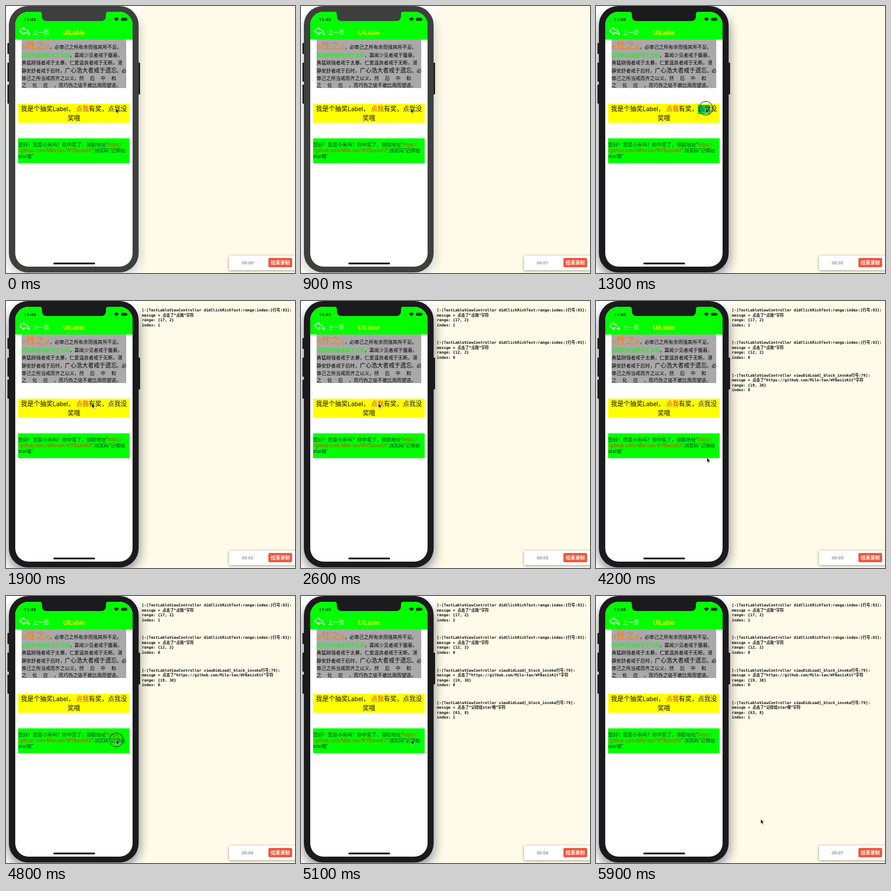
Animation, 500 px wide and 462 px high, one loop 6 s. Source, as an HTML page:

```html
<!DOCTYPE html>
<html lang="zh-CN">
<head>
<meta charset="utf-8">
<title>UILable</title>
<style>
  html, body { margin: 0; width: 100%; height: 100%; overflow: hidden; background: #fffbe8; }
  svg { display: block; width: 500px; height: 462px; }
  text { font-family: Roboto, "Noto Sans CJK SC", "Noto Sans CJK", sans-serif; white-space: pre; }
  .poem { font-size: 8.3px; fill: #000; }
  .prize { font-size: 11px; fill: #15150c; text-anchor: middle; }
  .note { font-size: 8.45px; fill: #04382c; }
  .link { fill: #d04600; }
  .log text { font: bold 6.6px "DejaVu Sans Mono", "Noto Sans CJK SC", "Noto Sans CJK", monospace; fill: #111; }
</style>
</head>
<body>
<svg viewBox="0 0 500 462">
  <defs>
    <filter id="soft" x="-30%" y="-20%" width="160%" height="140%"><feGaussianBlur stdDeviation="9.5"/></filter>
    <filter id="faint" x="-20%" y="-60%" width="140%" height="220%"><feGaussianBlur stdDeviation="2.5"/></filter>
    <clipPath id="screen"><rect x="16" y="10" width="203" height="441" rx="23"/></clipPath>
  </defs>

  <rect width="500" height="462" fill="#fffbe8"/>
  <rect width="232" height="462" fill="#fff"/>
  <rect id="shadow" x="5" y="12" width="225" height="456" rx="32" filter="url(#soft)"/>

  <g fill="#1b1b1d">
    <rect x="2.5" y="64" width="5" height="19" rx="1"/>
    <rect x="2.5" y="98" width="5" height="33" rx="1"/>
    <rect x="2.5" y="136" width="5" height="33" rx="1"/>
    <rect x="227" y="98" width="5" height="55" rx="1"/>
  </g>
  <rect id="body" x="5" y="0" width="224.500" height="461" rx="33"/>

  <g clip-path="url(#screen)">
    <rect x="16" y="10" width="203" height="441" fill="#fff"/>
    <rect x="16" y="10" width="203" height="48" fill="#00fe00"/>
  </g>
  <path id="notch" d="M58 9.500Q62 10 62 14V17Q62 26 71 26H164Q173 26 173 17V14Q173 10 177 9.500Z"/>

  <text x="31" y="25.800" font-size="8" font-weight="bold" fill="#063006">11:45</text>
  <g fill="#062806">
    <circle cx="179" cy="24" r=".5"/><circle cx="182" cy="24" r=".5"/>
    <path d="M186.500 21.800Q191 18 195.500 21.800L191 26.200Z"/>
    <rect x="199" y="20.500" width="10" height="5" rx="1.200"/>
    <rect x="209.600" y="22" width="1" height="2"/>
  </g>
  <path d="M23.500 43L31 37V40.500Q39.500 41 40.500 50Q37 45.800 31 46V49.500Z" fill="none" stroke="#fff" stroke-width="1.200" stroke-linejoin="round"/>
  <text x="46.500" y="49.300" font-size="9.300" fill="#fff">上一页</text>
  <text x="117.500" y="49.500" font-size="10.300" font-weight="600" fill="#f4f000" text-anchor="middle" style="font-family: Inter, sans-serif">UILable</text>

  <rect x="27" y="58" width="181" height="84" fill="#a9a9a9"/>
  <g class="poem">
    <text x="27" y="74"><tspan fill="#f97c10">治<tspan font-size="16">性之</tspan>道</tspan>，必审己之所有余而强其所不足。</text>
    <text x="27" y="88"><tspan fill="#00ff00">盖聪明疏通者戒于太察</tspan>，寡闻少见者戒于壅蔽，</text>
    <text x="27" y="100.500">勇猛刚强者戒于太暴，仁爱温良者戒于无断。湛</text>
    <text x="27" y="115">静安舒者戒于后时，<tspan font-size="10">广心浩大者戒于遗忘</tspan>。必</text>
    <text x="27" y="127.500">审己之所当戒而齐之以义，<tspan letter-spacing="10.300">然后中和</tspan></text>
    <text x="27" y="140"><tspan letter-spacing="10.300">之化应</tspan>，而巧伪之徒不敢比周而望进。</text>
  </g>

  <rect x="21" y="169" width="193" height="33" fill="#ffff00"/>
  <rect id="hit0" x="176" y="171" width="22" height="16" fill="#10d848"/>
  <rect id="hit1" x="121" y="171" width="22" height="16" fill="#10d848"/>
  <g class="prize">
    <text x="117.500" y="182">我是个抽奖Label， <tspan fill="#d83a20">点我</tspan>有奖，<tspan fill="#20206c">点我</tspan>没</text>
    <text x="117.500" y="197.500">奖哦</text>
  </g>

  <rect x="21" y="229" width="193" height="43" fill="#00fe00"/>
  <g class="note">
    <text x="21" y="243.300">您好！您是小禾吗？你中奖了，领取地址“<tspan class="link">https:/</tspan></text>
    <text x="21" y="253.300"><tspan class="link">/github.com/Milo-tan/WYBasisKit</tspan>”,领奖码“记得给</text>
    <text x="21" y="263.300">star哦”</text>
  </g>
  <rect x="82" y="444" width="72" height="3" rx="1.500" fill="#080808"/>

  <g id="log" class="log"></g>

  <rect x="386" y="433" width="116" height="25" fill="#000" opacity=".4" filter="url(#faint)"/>
  <rect x="386" y="432" width="114" height="25" rx="1" fill="#fff"/>
  <text id="clock" x="418" y="447" font-size="8" fill="#666" text-anchor="middle"></text>
  <rect x="454" y="436" width="41" height="16" rx="2" fill="#f4553a"/>
  <text x="474.500" y="447.200" font-size="8.300" font-weight="bold" fill="#fff" text-anchor="middle">结束录制</text>

  <g id="cursor">
    <circle id="ring" r="12" fill="none" stroke="#222" stroke-width="1"/>
    <path d="M0 0V8.200L1.900 6.500L3.200 9.400L4.600 8.800L3.300 6H5.800Z" fill="#111" stroke="#fff" stroke-width=".6"/>
  </g>
</svg>

<script>
const LOOP = 6000, STEP = 100;
const $ = id => document.getElementById(id);
const show = (el, on) => el.setAttribute('visibility', on ? 'visible' : 'hidden');

// [time, x, y] of the pointer tip
const path = [
  [0, 190, 177], [1500, 190, 177], [2100, 134, 177], [2600, 134, 177],
  [3200, 186, 242], [3700, 186, 242], [4200, 192, 271], [4600, 191, 249],
  [5200, 191, 249], [5800, 285, 386], [6000, 285, 386]
];
// [press, release]
const clicks = [[1200, 1500], [2200, 2400], [3500, 3700], [4700, 4900]];

const tap = 'TestLableViewController didClickRichText:range:index:]行号:93';
const block = 'TestLableViewController viewDidLoad]_block_invoke行号:79';
const entries = [
  [tap, '点我', '17, 2', 1],
  [tap, '点我', '12, 2', 0],
  [block, 'https://github.com/Milo-tan/WYBasisKit', '19, 38', 0],
  [block, '记得给star哦', '63, 8', 1]
];

const logs = entries.map(([head, word, range, index], i) => {
  const g = document.createElementNS('http://www.w3.org/2000/svg', 'g');
  const lines = [`[-[${head}]:`, `messge = 点击了“${word}”字符`, `range: {${range}}`, `index: ${index}`];
  g.innerHTML = lines.map((s, k) => `<text x="235" y="${18 + i * 56.3 + k * 8.5}">${s}</text>`).join('');
  return $('log').appendChild(g);
});

const ease = p => p * p * (3 - 2 * p);

function pointer(t) {
  const i = path.findIndex((_, k) => t < path[k + 1][0]);
  const [t0, x0, y0] = path[i], [t1, x1, y1] = path[i + 1];
  const p = ease((t - t0) / (t1 - t0));
  return [x0 + (x1 - x0) * p, y0 + (y1 - y0) * p];
}

function render(t) {
  const focused = t >= clicks[0][0];
  const shell = focused ? '#1b1b1d' : '#3e403e';
  $('body').setAttribute('fill', shell);
  $('notch').setAttribute('fill', shell);
  $('shadow').setAttribute('opacity', focused ? .48 : .22);

  const down = clicks.map(([a, b]) => t >= a && t < b);
  show($('ring'), down.some(Boolean));
  show($('hit0'), down[0]);
  show($('hit1'), down[1]);
  logs.forEach((g, i) => show(g, t >= clicks[i][1]));

  $('cursor').setAttribute('transform', `translate(${pointer(t)})`);
  $('clock').textContent = '00:0' + Math.floor(t * .0012 + .5);
}

const start = performance.now();
function tick() {
  const t = (performance.now() - start) % LOOP;
  render(Math.floor(t / STEP) * STEP);
  requestAnimationFrame(tick);
}
tick();
</script>
</body>
</html>
```
